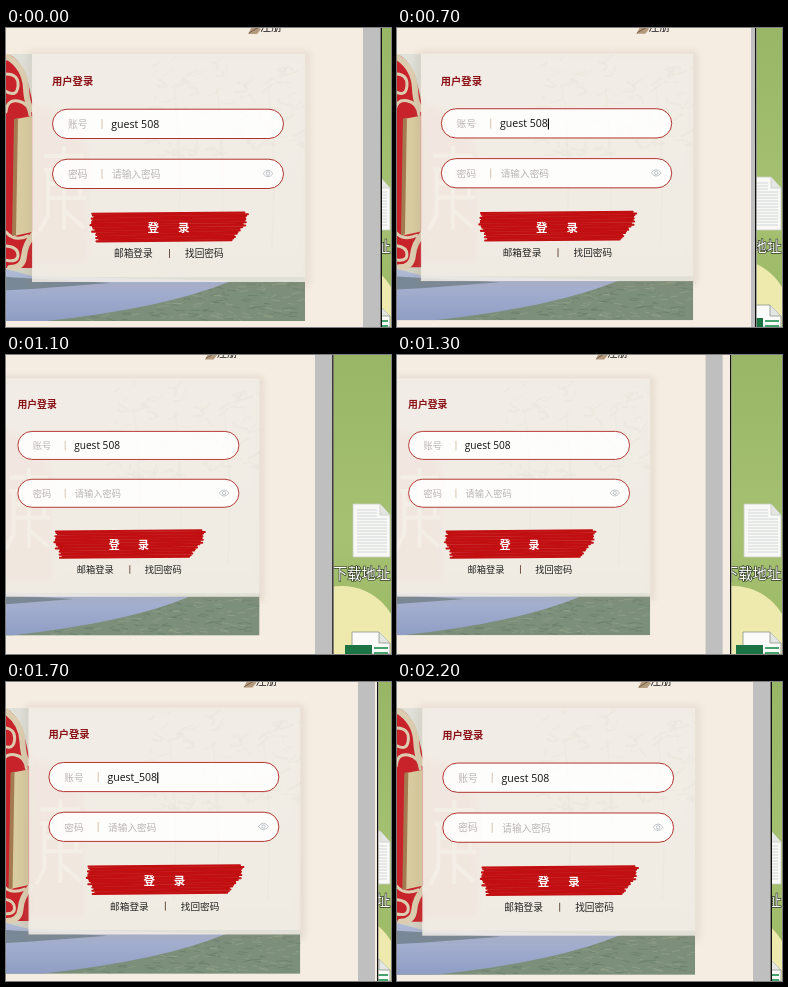
These frames come from a looping animation (385x299 px, 2.5 s). An HTML page:

```html
<!DOCTYPE html>
<html lang="zh">
<head>
<meta charset="utf-8">
<title>用户登录</title>
<style>
html, body { margin: 0; width: 100%; height: 100%; overflow: hidden; background: #f5ece2; }
svg { display: block; width: 100vw; height: 100vh; }
text { font-family: "Noto Sans CJK SC", "Noto Sans CJK", "Open Sans", sans-serif; font-size: 9.7px; fill: #222; }
.latin { font-family: "Open Sans", "Noto Sans", sans-serif; font-size: 10.6px; fill: #111; }
.title { font-size: 10.3px; font-weight: 700; fill: #8b1217; }
.hint { fill: #b9b4b0; }
.submit { font-size: 11.5px; font-weight: 700; fill: #fff; }
.field { fill: #fff; fill-opacity: .88; stroke: #b23430; stroke-width: 1; }
.curl { fill: none; stroke: #dccdb0; stroke-width: 3; stroke-linecap: round; }
.icon-label { font-size: 14.3px; fill: #fff; stroke: #26301c; stroke-width: 1.2; paint-order: stroke; }
</style>
</head>
<body>
<svg viewBox="0 0 385 299" preserveAspectRatio="none">
  <defs>
    <linearGradient id="desk" x1="0" y1="0" x2="0" y2="1">
      <stop offset="0" stop-color="#98b666"/><stop offset=".6" stop-color="#a6c172"/><stop offset="1" stop-color="#9ab863"/>
    </linearGradient>
    <linearGradient id="air" x1="0" y1="0" x2="0" y2="1">
      <stop offset="0" stop-color="#dfe0d8"/><stop offset=".7" stop-color="#d6d5c8"/><stop offset="1" stop-color="#c9ccba"/>
    </linearGradient>
    <linearGradient id="band" x1="0" y1="0" x2="0" y2="1">
      <stop offset="0" stop-color="#b4bed8"/><stop offset="1" stop-color="#909dc4"/>
    </linearGradient>
    <filter id="blur" x="-20%" y="-20%" width="140%" height="140%"><feGaussianBlur stdDeviation="4"/></filter>
    <clipPath id="windowClip"><rect id="windowArea" height="299"/></clipPath>
    <clipPath id="photoClip"><rect x="-80" y="26" width="379" height="267"/></clipPath>
  </defs>

  <g id="desktop">
    <rect x="300" width="85" height="299" fill="url(#desk)"/>
    <ellipse cx="336" cy="291" rx="58" ry="60" fill="#eee9ad"/>
    <g stroke-width=".8">
      <path d="M347 149h27l10 11v42h-37z" fill="#f8f8f6" stroke="#c9ccc5"/>
      <path d="M374 149v11h10" fill="#e4e6e4" stroke="#c9ccc5"/>
      <path d="M346 299V277h27l11 11v11z" fill="#fbfbf9" stroke="#8b9687"/>
      <path d="M373 277v11h11" fill="#e4e6e4" stroke="#8b9687"/>
    </g>
    <path id="lines" fill="none" stroke="#d3d7d8"/>
    <path d="M368 293h14M368 298h14" stroke="#47a36d" stroke-width="2"/>
    <rect x="339" y="290" width="27" height="12" fill="#1c7444"/>
    <text class="icon-label" x="327" y="224">下载地址</text>
  </g>

  <g clip-path="url(#windowClip)">
    <rect width="385" height="299" fill="#f5ece2"/>
    <g id="photo">
      <g clip-path="url(#photoClip)">
        <rect x="-80" y="26" width="379" height="267" fill="url(#air)"/>
        <g id="trees" fill="none" stroke="#a9ad98" stroke-linecap="round"></g>
        <path d="M-80 249H299V293H-80z" fill="#7c8f7b"/>
        <g id="grass" stroke-linecap="round"></g>
        <path d="M20 75Q78 80 82 130V236H20z" fill="#dba9a0" opacity=".65" filter="url(#blur)"/>
        <path d="M38 128h40M38 142h44M44 156h34M40 170h40M58 118v84M42 142v45l-8 16M74 142v28M58 182l20 18" fill="none" stroke="#efe6d4" stroke-width="4"/>
        <path d="M-80 27H4Q20 34 27 78V240H-80z" fill="#c8222a"/>
        <path d="M-80 26H-4L4 32-80 40z" fill="#e3e7ec"/>
        <path d="M2 29Q19 40 20 60T28 82M28 206Q19 216 18 228T4 240" class="curl" style="stroke-width:6"/>
        <path class="curl" d="M0 46q13 0 12 12t-13 5M0 84q1-13 12-11t12 14M0 218q12 1 12 9t-13 5M0 204q8 10 22 4"/>
        <path d="M10 91l16-3v116l-18 4z" fill="#d8cba0"/>
        <path d="M8 91l4-1-2 117-4 1z" fill="#a37a52"/>
        <path d="M-80 235L0 241 26 248 225 253Q160 280 40 293H-80z" fill="url(#band)"/>
        <path d="M-80 244L0 249 105 255 26 261-80 266z" fill="#788896"/>
      </g>
    </g>
    <g id="form">
      <rect x="25" y="27" width="275" height="228" fill="none" stroke="#9b8b7a" stroke-width="4" opacity=".3" filter="url(#blur)"/>
      <rect x="26" y="26" width="273" height="228" fill="#f6f1ea" fill-opacity=".83"/>
      <path d="M242 6l5-9 8 4-4 5z" fill="#b39a7d"/>
      <path d="M243 5l10-6" stroke="#765c45"/>
      <text x="254" y="3" style="font-size:11px">注册</text>
      <text class="title" x="46" y="57">用户登录</text>
      <rect class="field" x="46.5" y="81.2" width="231" height="29.3" rx="14.6"/>
      <rect class="field" x="46.5" y="131.2" width="231" height="29.3" rx="14.6"/>
      <text class="hint" x="62" y="99.7">账号</text>
      <text class="hint" x="62" y="149.7">密码</text>
      <path d="M96 91v10M96 141v10" stroke="#d9c4ad"/>
      <text class="latin" id="account" x="105.3" y="100"></text>
      <path id="caret" d="M0 91v11" stroke="#000" stroke-width="1.1"/>
      <text class="hint" x="106" y="149.9">请输入密码</text>
      <path d="M257 145.5q5-6.5 10 0q-5 6.5-10 0z" fill="none" stroke="#b7bcc1" stroke-width=".9"/>
      <circle cx="262" cy="145.5" r="1.7" fill="none" stroke="#b7bcc1" stroke-width=".9"/>
      <g id="brush" stroke="#c10f12" stroke-linecap="round"></g>
      <text class="submit" x="141.5" y="204.3">登</text>
      <text class="submit" x="172" y="204.3">录</text>
      <text x="108" y="229.3">邮箱登录</text>
      <path d="M163.5 221v9" stroke="#6a5140"/>
      <text x="179" y="229.3">找回密码</text>
    </g>
    <rect id="bar" width="17" height="299" fill="#bfbfbf"/>
    <rect id="newBar" width="14" height="299" fill="#bfbfbf"/>
    <rect id="edge" height="299" fill="#101010"/>
  </g>
</svg>
<script>
const LOOP = 2500, LAG = 150;
const $ = id => document.getElementById(id);
const set = (el, attrs) => { for (const k in attrs) el.setAttribute(k, attrs[k]); };

// Right edge of the dragged window: [ms, px]
const drag = [[0, 376], [500, 376], [550, 373], [700, 359.5], [750, 354.5], [900, 330.5],
  [950, 328], [1200, 327.5], [1350, 338], [1500, 365], [1550, 371], [1700, 372.5], [2000, 375], [LOOP, 375]];

function windowRight(t) {
  const i = drag.findIndex(([at]) => at >= t);
  if (i < 1) return drag[0][1];
  const [t0, x0] = drag[i - 1], [t1, x1] = drag[i];
  return x0 + (x1 - x0) * (t - t0) / (t1 - t0);
}

let seed = 7;
const rand = (a, b) => {
  seed = (seed * 16807) % 2147483647;
  return a + (b - a) * seed / 2147483647;
};

function stroke(parent, d, attrs) {
  const path = document.createElementNS("http://www.w3.org/2000/svg", "path");
  set(path, { d, ...attrs });
  $(parent).append(path);
}

function paintTextures() {
  for (let i = 0; i < 18; i++) {
    const y = 185.2 + i * 1.62;
    const left = 82 + Math.abs(i - 6) * .7 + rand(0, 5);
    const right = 243 - 16 * (i / 17) ** 2 - rand(0, 5);
    stroke("brush", `M${left} ${y + .6}L${right} ${y - .6}`, { "stroke-width": 2.1 });
  }
  for (let i = 0; i < 260; i++) {
    const x = rand(-40, 297), y = rand(255, 292);
    stroke("grass", `M${x} ${y}l${rand(2, 9)} ${rand(-2, 2)}`, { stroke: i % 2 ? "#97a68d" : "#637b68", "stroke-width": 1, opacity: .6 });
  }
  for (let i = 0; i < 90; i++) {
    const x = rand(150, 299), y = rand(28, 130);
    stroke("trees", `M${x} ${y}q${rand(-8, 8)} ${rand(-7, 7)} ${rand(-15, 15)} ${rand(-9, 9)}`, { "stroke-width": rand(1, 3), opacity: .5 });
  }
  for (const x of [172, 215, 266]) stroke("trees", `M${x} 218Q${x + 5} 130 ${x - 4} 60`, { "stroke-width": 2, opacity: .4 });
  const rows = Array.from({ length: 15 }, (_, i) => `M351 ${155 + i * 3}h${i < 3 ? 20 : 30}`);
  set($("lines"), { d: rows.join("") });
}

function render(time) {
  const t = time < 500 ? 0 : Math.floor(time / 100) * 100;
  const right = windowRight(t);
  const page = windowRight(Math.max(0, t - LAG)) - 19; // layout trails the drag
  const scale = (232 - (357 - page) * .208) / 232;
  const x = page - 79 * scale - 278 * scale;
  const lift = -1.3 * Math.min(1, (1 - scale) / .015);
  const gap = right - page - 19 > 8;
  const edge = gap ? 4.5 : 1.5;

  set($("windowArea"), { width: right });
  set($("photo"), { transform: `translate(${x} 0) scale(${scale})` });
  set($("form"), { transform: `translate(${x} ${lift}) scale(${scale})` });
  set($("bar"), { x: page });
  set($("newBar"), { x: right - 19, visibility: gap ? "visible" : "hidden" });
  set($("edge"), { x: right - edge, width: edge });

  const caretOn = t >= 600 && Math.floor((t - 600) / 500) % 2 === 0;
  $("account").textContent = caretOn && t >= 800 ? "guest_508" : "guest 508";
  const end = 105.9 + $("account").getComputedTextLength();
  set($("caret"), { transform: `translate(${end} 0)`, visibility: caretOn ? "visible" : "hidden" });
}

paintTextures();
const start = performance.now();
function tick() {
  render((performance.now() - start) % LOOP);
  requestAnimationFrame(tick);
}
tick();
</script>
</body>
</html>
```
